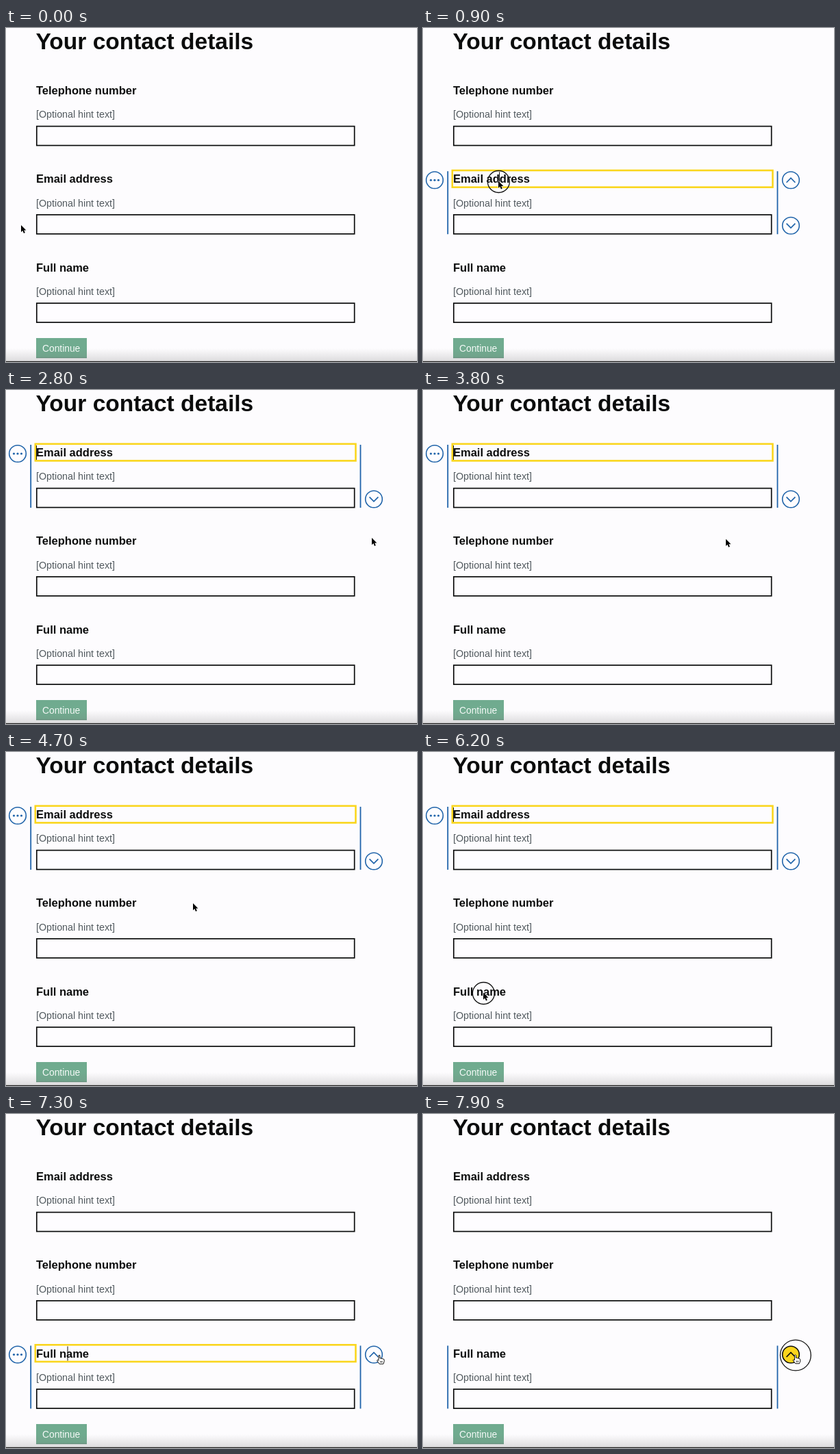
Recreate the animation shown at these times as an HTML page. Size 600x488 px, loop 8 s.

```html
<!DOCTYPE html>
<html lang="en">
<head>
<meta charset="utf-8">
<title>Your contact details</title>
<style>
  html, body { margin: 0; width: 100%; height: 100%; overflow: hidden; background: #fdfcfe; }
  svg { display: block; width: 600px; height: 488px; }
  text { font-family: "Liberation Sans", Arial, sans-serif; fill: #0b0c0c; }
  .title { font-size: 33.5px; font-weight: 700; }
  .label { font-size: 16.5px; font-weight: 700; }
  .hint { font-size: 14.27px; fill: #50585d; }
  .field { fill: #fefdff; stroke: #0b0c0c; stroke-width: 1.7; }
  .outline { fill: none; stroke: #fad61d; stroke-width: 2.6; }
  .round { fill: #fefdff; stroke: #2064aa; stroke-width: 1.6; }
  .bar { fill: none; stroke: #2064aa; stroke-width: 1.8; }
  .chevron { fill: none; stroke: #2064aa; stroke-width: 1.7; }
  .dot { fill: #2064aa; }
  .pressed .round { fill: #fcd51c; stroke: #0b0c0c; }
  .pressed .chevron { stroke: #0b0c0c; }
  .pointer { stroke: #fff; stroke-width: 1; paint-order: stroke; }
  .hand { fill: #fff; stroke: #111; stroke-width: 1; stroke-linejoin: round; }
</style>
</head>
<body>
<svg viewBox="0 0 600 488">
  <defs>
    <linearGradient id="shade" x1="0" y1="0" x2="0" y2="1">
      <stop offset="0" stop-color="#777" stop-opacity="0"/>
      <stop offset="1" stop-color="#777" stop-opacity=".24"/>
    </linearGradient>
  </defs>
  <rect width="600" height="488" fill="#fdfcfe"/>
  <text class="title" x="43.5" y="31">Your contact details</text>
  <g id="blocks"></g>

  <g id="tools">
    <path class="bar" d="M36.2 80V172M517.5 80V172"/>
    <g id="dots">
      <circle class="round" cx="17" cy="93" r="12.3"/>
      <circle class="dot" cx="11.5" cy="93" r="1.6"/>
      <circle class="dot" cx="17" cy="93" r="1.6"/>
      <circle class="dot" cx="22.5" cy="93" r="1.6"/>
    </g>
    <rect id="focus" class="outline" x="42.8" y="78.8" width="467.7" height="24.6"/>
    <g id="up">
      <circle class="round" cx="537" cy="93" r="12.3"/>
      <path class="chevron" d="M530.6 96.5l6.4-6.6 6.4 6.6"/>
    </g>
    <g id="down">
      <circle class="round" cx="537" cy="159.5" r="12.3"/>
      <path class="chevron" d="M530.6 156.3l6.4 6.6 6.4-6.6"/>
    </g>
    <path id="caret" d="M0 81V102" stroke="#111" stroke-width="1"/>
  </g>

  <rect x="44" y="453" width="74" height="29.3" fill="#568c72"/>
  <rect x="44" y="453" width="74" height="28.2" fill="#70ab8f"/>
  <text x="53" y="472.5" font-size="13.8" style="fill:#f7fbf9">Continue</text>
  <rect y="468" width="600" height="19" fill="url(#shade)"/>
  <rect y="486.8" width="600" height="1.2" fill="#222"/>

  <circle id="ring" fill="none" stroke="#111" stroke-width="1.3"/>
  <g id="cursor">
    <path id="arrow" class="pointer" d="M0 0V10.2L2.3 8 4 11.9 5.8 11.1 4.2 7.4H7.4Z"/>
    <path id="hand" class="hand" d="M-1 1Q0-.5 1 1V5Q2.2 4.2 3 5.4 4.4 4.6 5.2 6 7 5.6 7.2 7.2V9.5L6 13.2H.2L-3.2 8.6Q-3.4 7.2-2 7.4L-1 8.4ZM2 9V11.2M4 9V11.2"/>
  </g>
</svg>
<script>
  const LOOP = 8000, STEP = 100, PITCH = 129.25;
  const SWAP = 2800;
  const clicks = [900, 2600, 6200, 7800];
  // time, x, y
  const path = [
    [0, 22, 288], [300, 22, 288], [800, 110, 223.5], [1300, 110, 223.5],
    [2000, 520, 215], [2200, 534.5, 215.5], [2800, 534, 216], [3400, 534, 216],
    [4400, 273, 221], [5200, 273, 221], [6000, 88, 351], [6200, 88, 351.5],
    [6700, 90, 351], [7200, 545, 352], [7900, 543.5, 351.5]
  ];
  // start, block, caret x
  const selections = [[900, 1, 111.5], [SWAP, 0, 44.5], [6300, 2, 90]];

  const el = id => document.getElementById(id);
  const show = (id, on) => el(id).setAttribute("display", on ? "inline" : "none");

  el("blocks").innerHTML = ["Telephone number", "Email address", "Full name"].map((name, i) => `
    <g transform="translate(0 ${i * PITCH})">
      <text class="label" x="44" y="97">${name}</text>
      <text class="hint" x="44" y="131.3">[Optional hint text]</text>
      <rect class="field" x="44.8" y="143.6" width="463.9" height="28"/>
    </g>`).join("");
  const labels = document.querySelectorAll(".label");

  function pointerAt(t) {
    const i = path.findIndex(p => p[0] > t);
    if (i < 0) return path[path.length - 1].slice(1);
    const [t0, x0, y0] = path[i - 1], [t1, x1, y1] = path[i];
    const k = (t - t0) / (t1 - t0), e = k * k * (3 - 2 * k);
    return [x0 + (x1 - x0) * e, y0 + (y1 - y0) * e];
  }

  function draw(t) {
    const swapped = t >= SWAP;
    labels[0].textContent = swapped ? "Email address" : "Telephone number";
    labels[1].textContent = swapped ? "Telephone number" : "Email address";

    const current = selections.filter(s => s[0] <= t).pop();
    const pressed = (t >= 2600 && t < SWAP) || t >= 7800;
    show("tools", current);
    if (current) {
      const [start, block, caretX] = current;
      el("tools").setAttribute("transform", `translate(0 ${block * PITCH})`);
      show("up", block > 0);
      show("down", block < 2);
      show("dots", !pressed);
      show("focus", !pressed);
      el("up").classList.toggle("pressed", pressed);
      const phase = t - start + (block === 2 ? 200 : 0);
      show("caret", !pressed && phase % 1000 < 500);
      el("caret").setAttribute("transform", `translate(${caretX} 0)`);
    }

    const [x, y] = pointerAt(t);
    const onButton = x > 527 && ((t > 2000 && t < SWAP) || t > 6700);
    show("hand", onButton);
    show("arrow", !onButton);
    el("cursor").setAttribute("transform", `translate(${x} ${y})`);

    const click = clicks.find(c => t >= c && t < c + 2 * STEP);
    show("ring", click !== undefined);
    if (click !== undefined) {
      const ring = el("ring");
      ring.setAttribute("cx", x + 0.4);
      ring.setAttribute("cy", y + 1);
      ring.setAttribute("r", 16 + 6.4 * (t - click) / STEP);
    }
  }

  function tick() {
    draw(Math.floor(performance.now() % LOOP / STEP) * STEP);
    requestAnimationFrame(tick);
  }
  tick();
</script>
</body>
</html>
```
